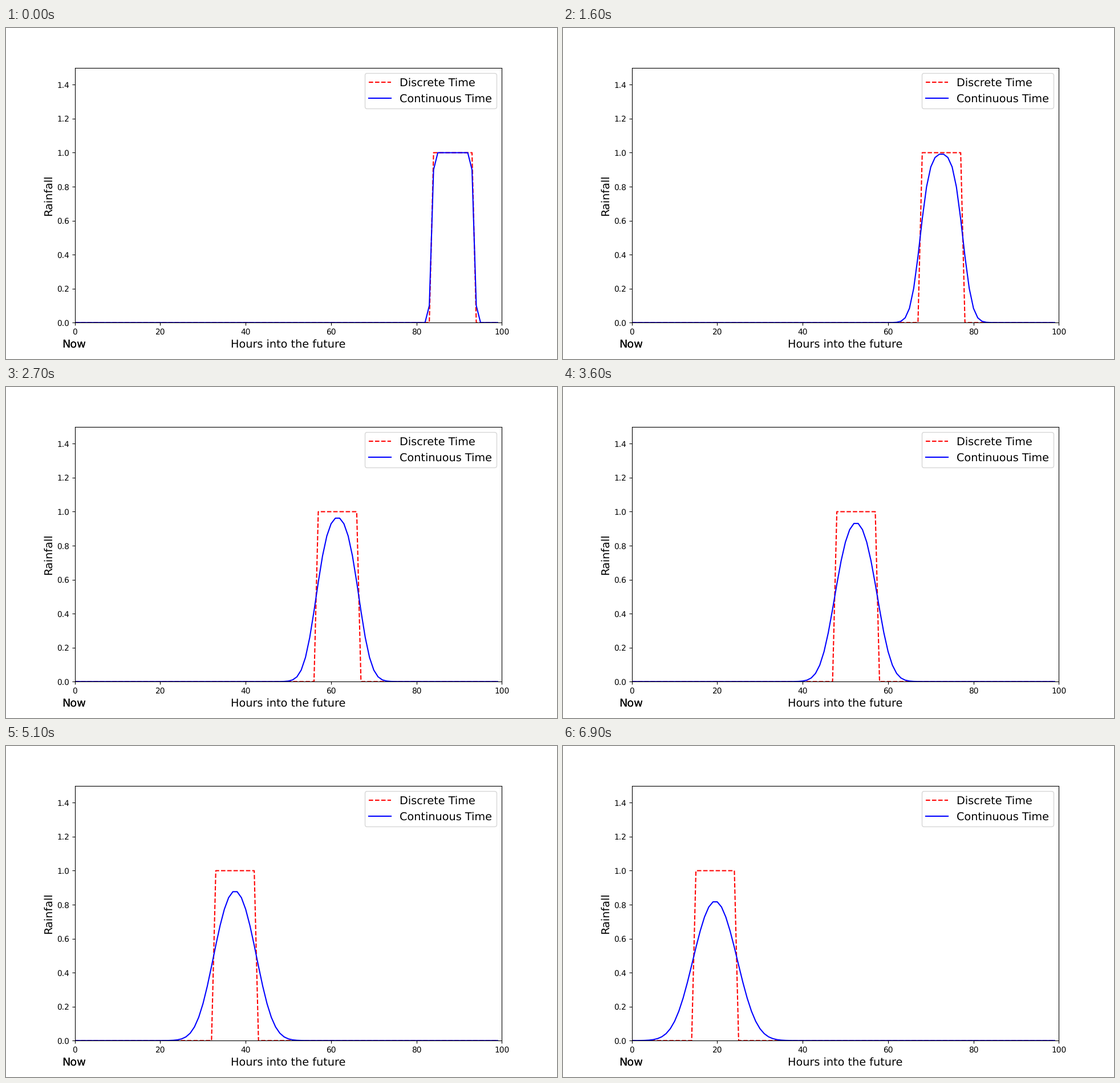
Write a matplotlib script that moves like this. It is 966 by 580 pixels and loops after 7 s.

```python
import numpy as np
import matplotlib.pyplot as plt
from matplotlib.animation import FuncAnimation

WIDTH, HEIGHT, DPI = 966, 580, 99
FRAMES = 70
INTERVAL = 100
HOURS = np.arange(100)
START, LENGTH = 84, 10
SPREAD = 0.1  # share leaking to each neighbour per step
EPS = 1e-6  # keeps the pixel size from rounding down


def block(frame):
    """Rain as a rigid block that moves one hour closer per step."""
    first = START - frame
    return ((HOURS >= first) & (HOURS < first + LENGTH)).astype(float)


def diffused(frame):
    """The same block, smeared a little more at every step."""
    rain = block(frame)
    for _ in range(frame + 1):
        rain = (1 - 2 * SPREAD) * rain + SPREAD * (np.roll(rain, 1) + np.roll(rain, -1))
    return rain


plt.rcParams["font.family"] = "DejaVu Sans"
plt.rcParams["text.hinting"] = "none"
fig, ax = plt.subplots(figsize=((WIDTH + EPS) / DPI, (HEIGHT + EPS) / DPI), dpi=DPI)
discrete, = ax.plot(HOURS, block(0), "r--", label="Discrete Time")
continuous, = ax.plot(HOURS, diffused(0), "b-", label="Continuous Time")

ax.set_xlim(0, 100)
ax.set_ylim(0, 1.5)
ax.set_xlabel("Hours into the future", fontsize=14)
ax.set_ylabel("Rainfall", fontsize=14)
ax.legend(loc="upper right", fontsize=14)

# Overprinting gives the label its heavier edges.
for _ in range(2):
    ax.text(-3, -0.15, "Now", fontsize=14)


def update(frame):
    discrete.set_ydata(block(frame))
    continuous.set_ydata(diffused(frame))
    return discrete, continuous


anim = FuncAnimation(fig, update, frames=FRAMES, interval=INTERVAL,
                     repeat=True, repeat_delay=0, blit=False)
plt.show()
```
